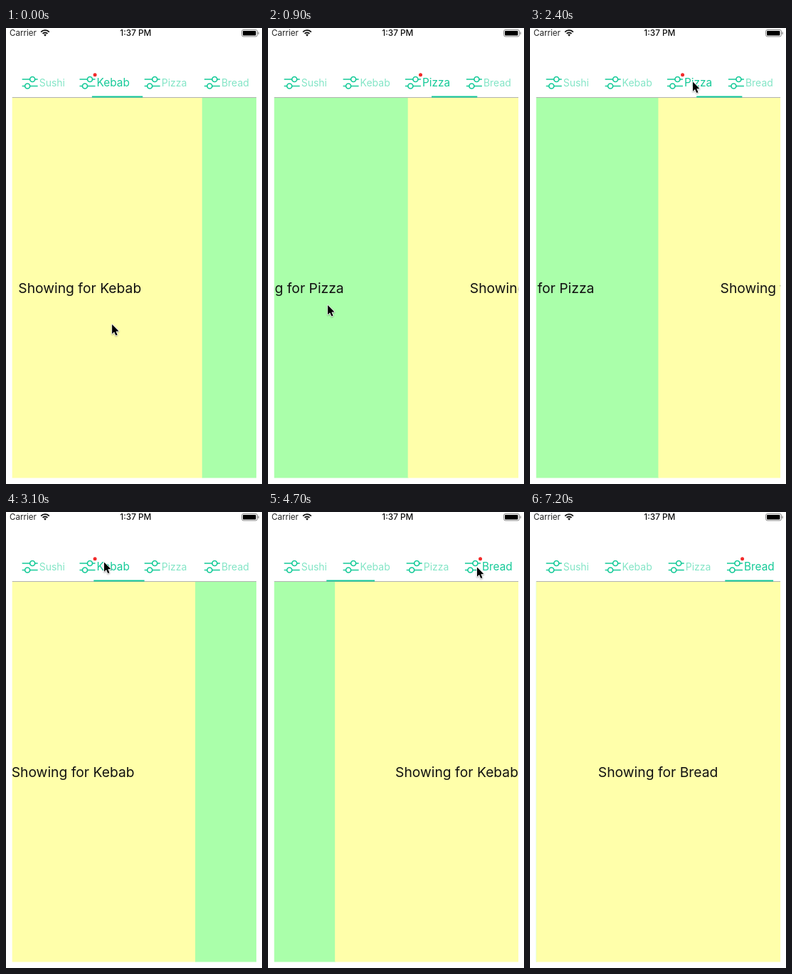
An HTML page with a canvas that plays this animation: 360 px wide and 640 px high, repeating every 7300 ms.

```html
<!DOCTYPE html>
<html lang="en">
<head>
<meta charset="utf-8">
<title>Tab pager</title>
<style>
  html, body { margin: 0; width: 100%; height: 100%; overflow: hidden; background: #fff; }
  canvas { display: block; width: 360px; height: 640px; }
</style>
</head>
<body>
<canvas id="stage" width="360" height="640"></canvas>
<script>
const ctx = document.getElementById('stage').getContext('2d');
const LOOP = 7300, STEP = 100;
const FONT = 'Inter, "Liberation Sans", sans-serif';
const PAGE = { x: 8.7, y: 98, w: 343.4, h: 533.7 };
const MINT = '#15ca98', MINT_LIGHT = '#83e5c6';
const YELLOW = '#ffffaa', GREEN = '#aaffaa';

const tabs = ['Sushi', 'Kebab', 'Pizza', 'Bread'];
const SLOT = PAGE.w / tabs.length;
const ICON_GAP = 24;

const SWIPE_TIME = 600, TAP_TIME = 300, TAP_HOLD = 250, TAP_LEAD = 150;

// Each gesture presses at (x, y) and brings the pager to page `to`.
const gestures = [
  { start: -183, to: 2, x: 225.5, y: 416, swipe: true },
  { start: 619, to: 3, x: 239.5, y: 389, swipe: true },
  { start: 2250, to: 2, x: 229, y: 75.5 },
  { start: 2898, to: 1, x: 138, y: 70.5 },
  { start: 3700, to: 0, x: 60, y: 75 },
  { start: 4602, to: 3, x: 294, y: 77.5 },
  { start: 5800, to: 3, x: 175, y: 279 },
  { start: 6500, to: 3, x: 168, y: -25 }
];

const clamp01 = u => Math.max(0, Math.min(1, u));
const mix = (a, b, u) => a + (b - a) * u;
const ease = u => { u = clamp01(u); return u * u * (3 - 2 * u); };

function pagerState(t) {
  const i = gestures.findLastIndex(g => g.start <= t);
  const { start, to, swipe } = gestures[i];
  const from = i ? gestures[i - 1].to : 1;
  const page = mix(from, to, ease((t - start) / (swipe ? SWIPE_TIME : TAP_TIME)));
  return { page, active: swipe ? Math.round(page) : to };
}

// A swiping pointer carries the page halfway, then lets go.
function pointerAt(t) {
  const lead = g => g.swipe ? 0 : TAP_LEAD;
  const i = gestures.findLastIndex(g => g.start - lead(g) <= t);
  const g = gestures[i], next = gestures[i + 1];
  const hold = g.swipe ? SWIPE_TIME / 2 : TAP_HOLD;
  const pulled = g.swipe ? ease(Math.min(0.5, (t - g.start) / SWIPE_TIME)) : 0;
  const x = g.x - PAGE.w * pulled;
  if (!next) return [x, g.y];
  const leave = g.start + hold;
  const u = ease((t - leave) / (next.start - lead(next) - leave));
  return [mix(x, next.x, u), mix(g.y, next.y, u)];
}

function setFont(size, weight = 400) {
  ctx.font = `${weight} ${size}px ${FONT}`;
}

function text(str, x, y, size, color, align = 'left', weight = 400) {
  setFont(size, weight);
  ctx.fillStyle = color;
  ctx.textAlign = align;
  ctx.fillText(str, x, y);
}

function circle(x, y, r) {
  ctx.beginPath();
  ctx.arc(x, y, r, 0, Math.PI * 2);
}

function roundBox(x, y, w, h, r) {
  ctx.beginPath();
  ctx.roundRect(x, y, w, h, r);
}

function drawStatusBar() {
  text('Carrier', 5, 11, 11.6, '#222');
  text('1:37 PM', 182.3, 11, 11.8, '#111', 'center', 550);

  ctx.strokeStyle = ctx.fillStyle = '#111';
  ctx.lineWidth = 1.8;
  const fan = r => ctx.arc(55, 11.2, r, -Math.PI * 0.76, -Math.PI * 0.24);
  for (const r of [4.7, 8]) {
    ctx.beginPath();
    fan(r);
    ctx.stroke();
  }
  ctx.beginPath();
  ctx.moveTo(55, 11.8);
  fan(2.5);
  ctx.fill();

  ctx.strokeStyle = '#888';
  ctx.lineWidth = 1;
  roundBox(331.5, 2.5, 22, 9.5, 2.5);
  ctx.stroke();
  ctx.fillStyle = '#000';
  roundBox(333, 4, 18.5, 6.5, 1);
  ctx.fill();
  ctx.fillStyle = '#888';
  ctx.fillRect(354.5, 5.5, 1.2, 3.5);
}

function drawSlider(x, y, knob) {
  const r = 3.5;
  ctx.beginPath();
  ctx.moveTo(x, y);
  ctx.lineTo(x + knob - r, y);
  ctx.moveTo(x + knob + r, y);
  ctx.lineTo(x + 22, y);
  ctx.stroke();
  circle(x + knob, y, r);
  ctx.stroke();
}

function drawTab(name, i, on) {
  const size = on ? 15.4 : 14;
  setFont(size);
  const width = ICON_GAP + ctx.measureText(name).width;
  const x = PAGE.x + (i + 0.5) * SLOT + 1.2 - width / 2;
  ctx.strokeStyle = MINT;
  ctx.lineWidth = 1.7;
  drawSlider(x, 72, 14.5);
  drawSlider(x, 81.5, 7.5);
  text(name, x + ICON_GAP, 82, size, on ? MINT : MINT_LIGHT);
  if (on) {
    circle(x + 21.6, 65.8, 2.5);
    ctx.fillStyle = '#f22b2b';
    ctx.fill();
  }
  return width;
}

function drawTabs({ page, active }) {
  const widths = tabs.map((name, i) => drawTab(name, i, i === active));

  ctx.fillStyle = '#b2b2b2';
  ctx.fillRect(PAGE.x, 97, PAGE.w, 1);

  const bar = widths[active] + 1;
  const left = PAGE.x + page * SLOT + (SLOT - bar) / 2;
  const limit = PAGE.x + PAGE.w - 10 - bar;
  ctx.fillStyle = MINT;
  ctx.fillRect(Math.min(left, limit), 95.5, bar, 2);
}

function drawPages(page) {
  ctx.save();
  ctx.beginPath();
  ctx.rect(PAGE.x, PAGE.y, PAGE.w, PAGE.h);
  ctx.clip();
  tabs.forEach((name, i) => {
    const x = PAGE.x + (i - page) * PAGE.w;
    ctx.fillStyle = i % 2 ? YELLOW : GREEN;
    ctx.fillRect(x, PAGE.y, PAGE.w + 1, PAGE.h);
    text('Showing for ' + name, x + PAGE.w / 2 - 0.3, 372, 19.3, '#111', 'center');
  });
  ctx.restore();
}

function drawPointer(x, y) {
  ctx.save();
  ctx.translate(x, y);
  ctx.scale(0.94, 0.94);
  const arrow = new Path2D('M0 0V14L3.2 11.2 5.6 16.6 8 15.6 5.7 10.4 10 10.2Z');
  ctx.lineJoin = 'round';
  ctx.lineWidth = 1.6;
  ctx.strokeStyle = '#fff';
  ctx.shadowColor = 'rgba(0,0,0,.35)';
  ctx.shadowBlur = 2;
  ctx.shadowOffsetY = 1;
  ctx.stroke(arrow);
  ctx.shadowColor = 'transparent';
  ctx.fillStyle = '#000';
  ctx.fill(arrow);
  ctx.restore();
}

function render() {
  const t = Math.floor((performance.now() % LOOP) / STEP) * STEP;
  const state = pagerState(t);
  ctx.fillStyle = '#fff';
  ctx.fillRect(0, 0, 360, 640);
  drawStatusBar();
  drawPages(state.page);
  drawTabs(state);
  drawPointer(...pointerAt(t));
  requestAnimationFrame(render);
}
render();
</script>
</body>
</html>
```
